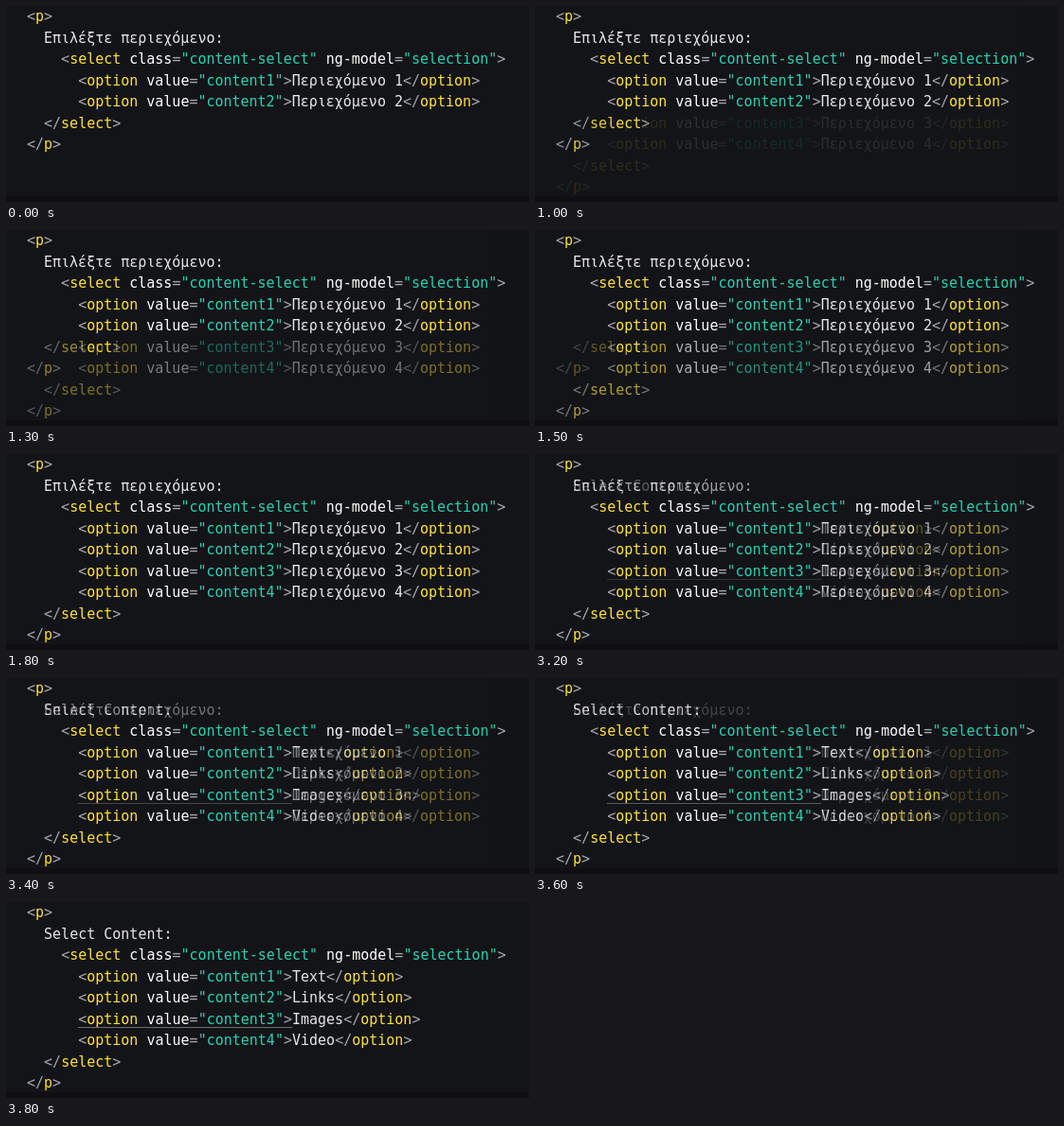
These frames come from a looping animation (552 by 207 pixels, 6300 ms). An HTML page:

```html
<!DOCTYPE html>
<html lang="en">
<head>
<meta charset="utf-8">
<title>Select markup</title>
<style>
  html, body { margin: 0; width: 100%; height: 100%; overflow: hidden; background: #131417; }
  .layer {
    position: absolute; left: 0; top: 0; width: 552px; height: 207px;
    overflow: hidden; background: linear-gradient(#131417 201px, #0f0f13 201px);
  }
  pre {
    position: absolute; left: 22px; top: 0; margin: 0;
    font: 15px/22.5px "DejaVu Sans Mono", monospace; color: #fff;
    letter-spacing: -.01px;
  }
  .latin pre { letter-spacing: 0; }
  .tag { color: #ffe13c; }
  .mark { color: #a7a7b0; }
  .str { color: #2bd0b5; }
  .text { color: #e6e6ea; }
  .rule { position: absolute; left: 76px; top: 132px; width: 226px; height: 1px; background: #6c6d70; }

  /* Both fades advance in nine hard 100 ms steps */
  .four { animation: fade-four 6.3s infinite; }
  .latin { animation: fade-latin 6.3s infinite; }
  @keyframes fade-four {
    0% { opacity: 0; animation-timing-function: step-end; }
    15.8729% { opacity: 0; animation-timing-function: steps(9, start); }
    30.1586%, 100% { opacity: 1; }
  }
  @keyframes fade-latin {
    0% { opacity: 0; animation-timing-function: step-end; }
    47.619% { opacity: 0; animation-timing-function: steps(9, start); }
    61.9047%, 100% { opacity: 1; }
  }
</style>
</head>
<body>
<div class="layer two"><pre></pre></div>
<div class="layer four"><pre></pre></div>
<div class="layer latin"><pre></pre><div class="rule"></div></div>
<script>
  const span = (kind, s) => {
    const safe = s.replace(/</g, "&lt;").replace(/>/g, "&gt;");
    return `<span class="${kind}">${safe}</span>`;
  };

  const paintTag = tag => tag.replace(
    /(<\/?)(\w+)|("[^"]*")|([=>])|([\w-]+)/g,
    (all, open, name, str, mark) =>
      open ? span("mark", open) + span("tag", name)
      : str ? span("str", str)
      : mark ? span("mark", mark)
      : all);

  const paint = code => code.split(/(<[^>]*>)/)
    .map(part => part[0] === "<" ? paintTag(part) : span("text", part))
    .join("");

  const markup = (label, items) => [
    "<p>",
    `  ${label}:`,
    '    <select class="content-select" ng-model="selection">',
    ...items.map((item, i) => `      <option value="content${i + 1}">${item}</option>`),
    "  </select>",
    "</p>"
  ].join("\n");

  const show = (layer, label, items) => {
    document.querySelector(`.${layer} pre`).innerHTML = paint(markup(label, items));
  };

  const greek = n => Array.from({ length: n }, (_, i) => `Περιεχόμενο ${i + 1}`);
  show("two", "Επιλέξτε περιεχόμενο", greek(2));
  show("four", "Επιλέξτε περιεχόμενο", greek(4));
  show("latin", "Select Content", ["Text", "Links", "Images", "Video"]);
</script>
</body>
</html>
```
